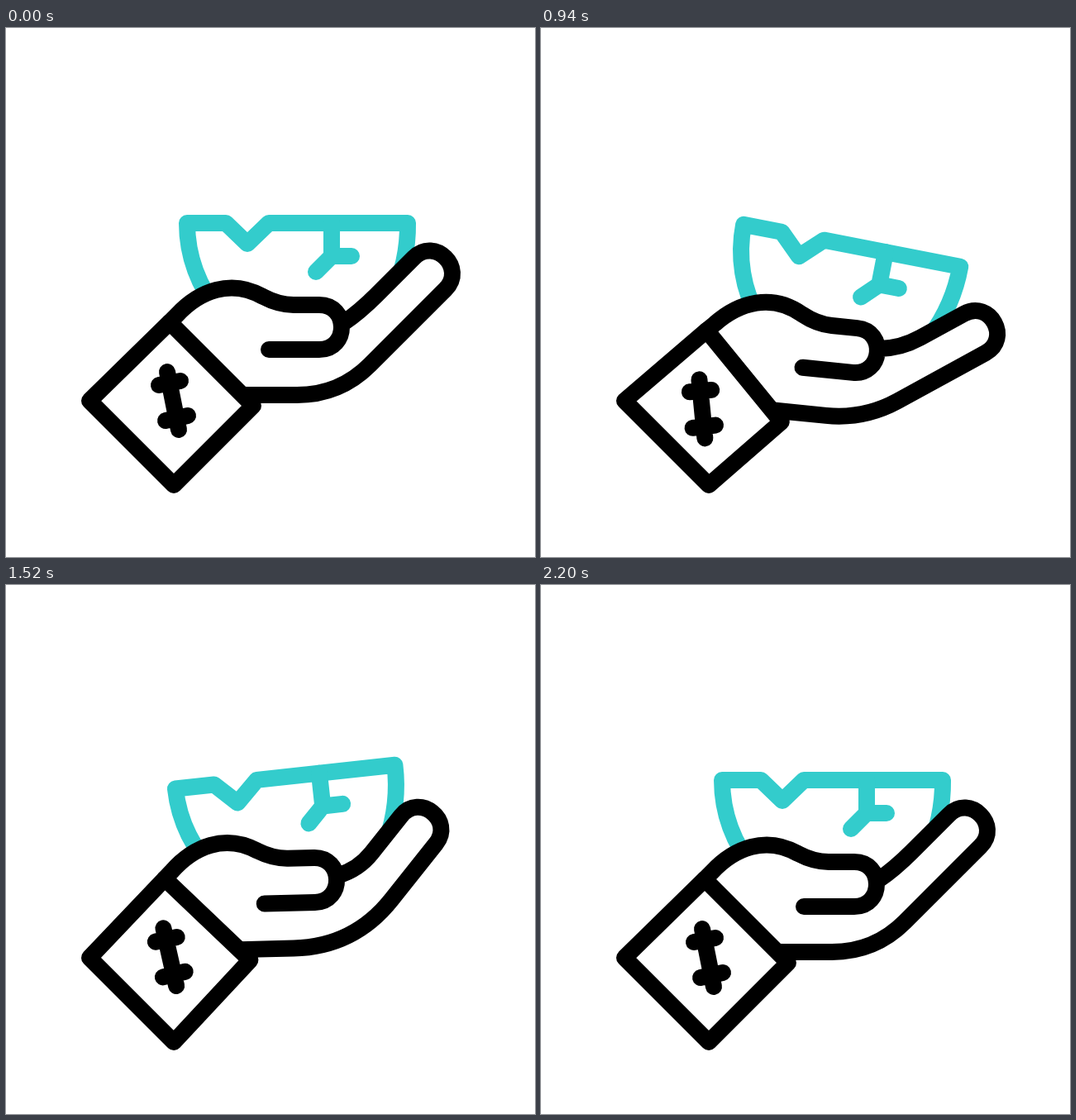
These frames come from a looping animation (640x640 px, 2.4 s). An HTML page with a canvas:

```html
<!DOCTYPE html>
<html>
<head>
<meta charset="utf-8">
<style>
html, body { margin: 0; width: 100%; height: 100%; overflow: hidden; background: #fff; }
canvas { display: block; }
</style>
</head>
<body>
<canvas id="stage" width="640" height="640"></canvas>
<script>
const ctx = document.getElementById('stage').getContext('2d');
const TEAL = '#33cccc', BLACK = '#000', LOOP = 2400;

// Each pose: palm shift and turn, fingertip centre and slope, bowl corner and turn (degrees).
const rest = [0, 0, 0, 512.5, 297, 45, 219, 236, 0];
const sunk = [-7.4, 5.2, 8.5, 536, 395, 19.5, 261, 232, 18];
const high = [-4, 2.5, -5.8, 478, 263, 67, 179, 262, -18.2];
const settle = [-3.4, -2, 3.9, 524, 336, 33, 236, 228, 8.2];
const keys = [[462, rest], [800, sunk], [1300, high], [1770, settle], [2210, rest]];

const clamp = v => Math.min(1, Math.max(0, v));
const ease = v => v * v * (3 - 2 * v);
const rad = deg => deg * Math.PI / 180;
const along = (p, dir, d) => [p[0] + dir[0] * d, p[1] + dir[1] * d];
const sub = (a, b) => [a[0] - b[0], a[1] - b[1]];
const dot = (a, b) => a[0] * b[0] + a[1] * b[1];
const cross = (a, b) => a[0] * b[1] - a[1] * b[0];

function poseAt(t) {
  let pose = rest;
  for (let i = 1; i < keys.length; i++) {
    const [from, a] = keys[i - 1], [to, b] = keys[i];
    const k = ease(clamp((t - from) / (to - from)));
    if (t >= from) pose = a.map((v, j) => v + (b[j] - v) * k);
  }
  return pose;
}

function draw(d, color, fill, cap = 'round') {
  const path = new Path2D(d);
  if (fill) {
    ctx.fillStyle = '#fff';
    ctx.fill(path);
  }
  if (color) {
    ctx.strokeStyle = color;
    ctx.lineCap = cap;
    ctx.stroke(path);
  }
}

function placed(x, y, turn, paint) {
  ctx.save();
  ctx.translate(x, y);
  ctx.rotate(rad(turn));
  paint();
  ctx.restore();
}

function drop(x, tail, head, end) {
  if (tail < end) draw(`M${x} ${tail}V${Math.min(head, end)}`, TEAL);
}

function drawFall(t) {
  const s = (t - 200) / 420, r = (t - 340) / 280;
  if (s <= 0 || t > 900) return;
  drop(301, 61 + 96 * s ** .88, 61 + 137 * s ** .61, 205);
  if (r > 0) drop(389, 75 + 19 * r * r, 76 + 53 * r, 168);
  if (t < 760) {
    const size = ease(clamp(s * 3));
    ctx.save();
    ctx.translate(360, 95 + 150 * s ** 1.54);
    ctx.scale(size, size);
    draw('M34 0A34 34 0 1 1 -34 0A34 34 0 1 1 34 0Z', BLACK);
    ctx.restore();
  }
}

function drawBowl() {
  draw('M39 106A133 150 0 0 1 0 0H47L73 25L99 0H267A200 200 0 0 1 247 90', TEAL, true, 'butt');
  draw('M175 0V40L156 59M175 40H199', TEAL);
}

function drawSign() {
  draw('M-7 -35L7 35M-17 -19L9 -24M-9 24L18 18', BLACK);
}

function drawHand([shiftX, shiftY, turn, tipX, tipY, slope]) {
  const c = Math.cos(rad(turn)), s = Math.sin(rad(turn));
  const palm = (x, y) => [
    150 + shiftX + (x - 150) * c - (y - 450) * s,
    450 + shiftY + (x - 150) * s + (y - 450) * c
  ];
  const onPalm = d => d.replace(/([\d.]+),([\d.]+)/g, (_, x, y) => palm(+x, +y));

  // The finger is a straight capsule, joined to the palm by tangent curves.
  const fs = Math.sin(rad(slope)), fc = Math.cos(rad(slope));
  const inward = [-fc, fs], side = [-fs, -fc], tip = [tipX, tipY];
  const top = along(tip, side, 27), under = along(tip, side, -27);
  const crook = palm(408, 357), heel = palm(352, 444);
  const reach = dot(sub(crook, top), inward);
  const run = cross(sub(under, heel), inward) / cross([c, s], inward);
  const corner = along(heel, [c, s], run);
  const straight = Math.max(0, dot(sub(corner, under), inward) - run);
  const finger = `${crook}Q${along(top, inward, reach * .8)} ${along(top, inward, reach * .55)}L${top}`
    + `C${along(top, inward, -36)} ${along(under, inward, -36)} ${under}`
    + `L${along(under, inward, straight)}Q${corner} ${heel}L${palm(288, 444)}`;

  const back = onPalm('M198,356L207,347C234,318 272,303 311,325Q330,335 348,335L379,335');
  const thumb = onPalm('C415,335 415,389 379,389L318,389');
  draw(`${back}L${finger}Z`, null, true);
  draw(`${back}${thumb}M${finger}`, BLACK);
  draw(`M101 451L${palm(198, 356)}L${palm(299, 457)}L203 553Z`, BLACK);
  placed(...palm(202, 451), turn, drawSign);
}

function frame(now) {
  const t = now % LOOP, pose = poseAt(t);
  ctx.fillStyle = '#fff';
  ctx.fillRect(0, 0, 640, 640);
  ctx.lineWidth = 20;
  ctx.lineJoin = 'round';
  drawFall(t);
  placed(...pose.slice(6), drawBowl);
  drawHand(pose);
  requestAnimationFrame(frame);
}

requestAnimationFrame(frame);
</script>
</body>
</html>
```
